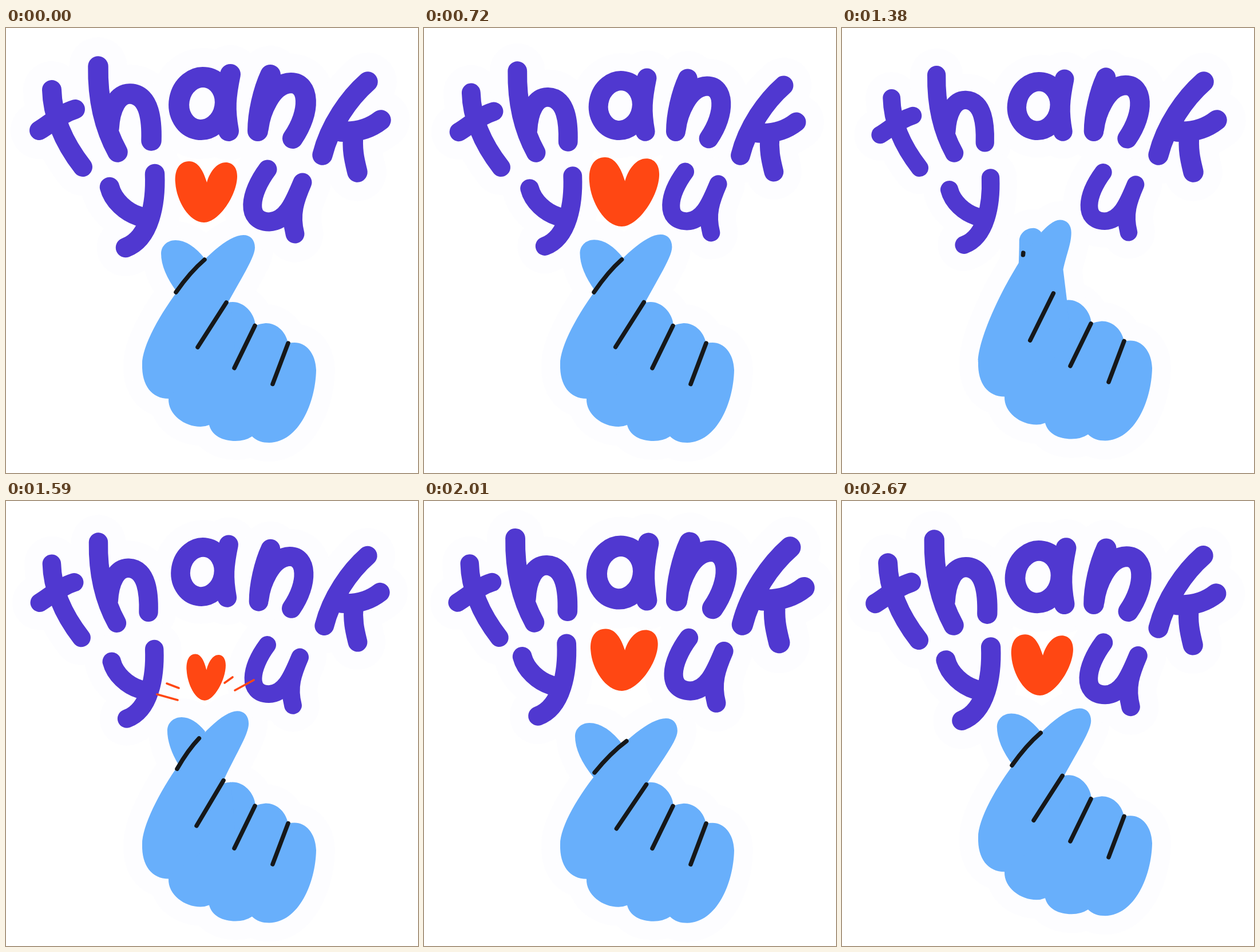
Animation, 720 px wide and 778 px high, one loop 2700 ms. Source, as an HTML page with a canvas:

```html
<!DOCTYPE html>
<html lang="en">
<head>
<meta charset="utf-8">
<title>thank you</title>
<style>
  html, body { margin: 0; width: 100%; height: 100%; overflow: hidden; background: #fff; }
  canvas { display: block; }
</style>
</head>
<body>
<canvas id="stage" width="720" height="778"></canvas>
<script>
const ctx = document.getElementById('stage').getContext('2d');
const LOOP = 2700, STEP = 30, WAVE = 900, HALO = 66;
const PURPLE = '#5038d0', ORANGE = '#ff4713', BLUE = '#68affb', INK = '#16181a', RIM = '#fdfdff';

const clamp = u => Math.min(1, Math.max(0, u));
const lerp = (a, b, u) => a + (b - a) * u;
const wave = (t, degrees) => Math.cos(2 * Math.PI * t / WAVE - degrees * Math.PI / 180);

function ease(t, from, to) {
  const u = clamp((t - from) / (to - from));
  return u * u * (3 - 2 * u);
}

// Swings out, overshoots and settles by the end of the loop.
function swing(t, start) {
  const u = clamp((t - start) / (LOOP - start));
  return 1.33 * (1 - u) * Math.sin(2 * Math.PI * u);
}

// Letters are thick strokes; x, y is the point each one pulses around.
const letter = (x, y, width, d) => ({ x, y, width, path: new Path2D(d) });

const rows = [
  { start: 1530, middle: 347, spread: .04, lag: 0, letters: [
    letter(151, 261, 34, 'M80 108C81 150 98 197 134 243M58 179C78 167 95 150 121 142'),
    letter(207, 235, 35.5, 'M161 67C160 125 172 175 195 217M180 175C182 140 195 114 217 115C252 116 255 165 254 197'),
    letter(347, 195, 36, 'M303 125A40 46 10 1 0 382 139A40 46 10 1 0 303 125M392 81C384 120 382 142 389 180'),
    letter(440, 198, 36, 'M462 82C449 110 440 150 440 180M441 175C444 150 462 97 498 96C530 96 534 145 501 193'),
    letter(553, 240, 35.5, 'M632 94C600 122 566 170 553 222M655 161C636 176 612 183 585 181M607 185C604 215 610 235 614 252')
  ] },
  { start: 1590, middle: 383, spread: .15, lag: 1, letters: [
    letter(255, 331, 34.5, 'M181 278C187 302 210 322 232 329M260 255C262 305 252 368 209 384'),
    letter(448, 321, 33, 'M457 247C425 290 418 338 460 339C492 338 505 300 518 270C505 300 496 325 505 360')
  ] }
];

const heart = new Path2D('M351 270C345 250 336 233 320 233C303 233 294 248 296 271C298 302 320 340 346 340C372 340 404 292 404 259C404 244 396 235 384 235C368 235 356 252 351 270Z');
const palm = new Path2D('M238 588C237 625 255 648 284 648C283 676 312 697 340 697Q348 697 355 694C360 713 379 722 401 722Q418 722 430 714C438 722 448 725 460 725C512 724 541 655 542 598C541 568 524 550 504 550Q498 550 493 551C488 528 471 516 454 516Q444 517 436 520C434 496 414 478 395 479L386 480L300 520Z');
const knuckles = new Path2D('M435 520.5L399 594.5M493 551L466 622.5');
const sparks = new Path2D('M302 327L281 319M300 348L264 338M382 318L396 308M400 331L433 313');

// q opens the crossed fingers above 0 and pinches them together at -1.
function indexFinger(q) {
  const tip = { x: 415 + 33 * q, y: 362 + 22 * q };
  const side = { x: tip.x + 20, y: tip.y + 22 };
  const pinch = Math.min(q, 0);
  const base = { x: 374 - 12 * pinch, y: 507 + 78 * pinch };
  const path = new Path2D();
  path.moveTo(238, 588);
  path.bezierCurveTo(238, 524, tip.x - 53 - 12 * q, tip.y, tip.x, tip.y);
  path.bezierCurveTo(tip.x + 12, tip.y, side.x, side.y - 14, side.x, side.y);
  path.bezierCurveTo(side.x, side.y + 20,
    lerp(side.x, base.x, .55), lerp(side.y, base.y, .55), base.x, base.y);
  path.lineTo(393, 479);
  path.lineTo(400, 560);
  path.lineTo(290, 640);
  return path;
}

function thumb(q) {
  const tip = { x: 296 - q * (31 - 6 * q), y: 371 + 17 * q };
  const side = { x: tip.x - 25, y: tip.y + 23 };
  const root = { x: 348, y: 404 + 42 * q };
  const end = { x: 299 - 9 * q, y: 462 + 38 * q };
  const path = new Path2D();
  path.moveTo(root.x, root.y);
  path.quadraticCurveTo((tip.x + root.x) / 2, tip.y, tip.x, tip.y);
  path.bezierCurveTo(tip.x - 15, tip.y, side.x, side.y - 12, side.x, side.y);
  path.quadraticCurveTo(side.x, lerp(side.y, end.y, .45), end.x, end.y);
  path.lineTo(330, 460);
  return path;
}

function creases(q) {
  const top = { x: 347 + 29 * q, y: 405 + 8 * q };
  const low = { x: 297 + 18 * q * q, y: 462 - 57 * Math.min(q, 0) ** 2 };
  const path = new Path2D();
  path.moveTo(low.x, low.y);
  path.quadraticCurveTo((low.x + top.x) / 2, (low.y + top.y) / 2 - (low.y - top.y) / 8, top.x, top.y);
  path.moveTo(385 + 15 * q, 480 + 12 * q);
  path.lineTo(335 + 6 * q, 558 + 8 * q);
  return path;
}

function stroke(path, color, width) {
  ctx.strokeStyle = color;
  ctx.lineWidth = width;
  ctx.stroke(path);
}

function fill(path, color, rim) {
  if (rim) stroke(path, RIM, HALO);
  ctx.fillStyle = rim ? RIM : color;
  ctx.fill(path);
}

function drawLetters(t, rim) {
  for (const row of rows) {
    row.letters.forEach(({ x, y, width, path }, i) => {
      const phase = 24 * (i + row.lag);
      const size = (1 + .05 * wave(t, phase)) / (1 + .05 * wave(0, phase));
      // Letters right above the heart leap sooner and higher.
      const near = Math.exp(-(((x - 347) / 60) ** 2));
      const push = swing(t, row.start - 40 * near);
      ctx.save();
      ctx.translate(x + (x - row.middle) * row.spread * push, y - (12 + 8 * near) * push);
      ctx.scale(size, size);
      ctx.translate(-x, -y);
      stroke(path, rim ? RIM : PURPLE, rim ? width + HALO : width);
      ctx.restore();
    });
  }
}

function drawHand(t, rim) {
  const q = -.137 + .145 * wave(t, -20) - .78 * ease(t, 900, 1140)
    + 1.39 * ease(t, 1440, 1800) - .61 * ease(t, 1880, 2220);
  const bob = 2.5 * (wave(t, -38) - wave(0, -38));
  const recoil = 18.4 * Math.sqrt(Math.sin(Math.PI * clamp((t - 1470) / 750)));
  ctx.save();
  ctx.translate(0, bob + recoil);
  for (const part of [palm, thumb(q), indexFinger(q)]) fill(part, BLUE, rim);
  if (!rim) {
    stroke(knuckles, INK, 7.5);
    stroke(creases(q), INK, 7.5);
  }
  ctx.restore();
}

function drawHeart(t) {
  const hidden = ease(t, 720, 1000) - ease(t, 1500, 1650);
  const swell = ease(t, 420, 720) - ease(t, 720, 1000);
  const pop = swing(t, 1530);
  const size = 1 - hidden + .13 * swell + .12 * pop;
  if (size < .01) return;
  const stretch = .06 * swing(t, 1590) - .26 * hidden;
  ctx.save();
  ctx.translate(349.5, 286.5 + 85 * hidden - 21 * pop);
  ctx.scale(size * (1 + stretch), size * (1 - stretch));
  ctx.translate(-349.5, -286.5);
  fill(heart, ORANGE);
  ctx.restore();
}

function drawSparks(t) {
  if (t < 1540 || t > 1720) return;
  const reach = 1 + (t - 1590) / 400;
  ctx.save();
  ctx.translate(349, 340);
  ctx.scale(reach, reach);
  ctx.translate(-349, -340);
  stroke(sparks, ORANGE, 3.6 * clamp((1740 - t) / 120));
  ctx.restore();
}

function draw(t) {
  ctx.fillStyle = '#fff';
  ctx.fillRect(0, 0, 720, 778);
  for (const rim of [true, false]) {
    drawHand(t, rim);
    drawLetters(t, rim);
  }
  drawHeart(t);
  drawSparks(t);
}

function tick() {
  draw(Math.floor(performance.now() % LOOP / STEP) * STEP);
  requestAnimationFrame(tick);
}

ctx.lineCap = ctx.lineJoin = 'round';
tick();
</script>
</body>
</html>
```
